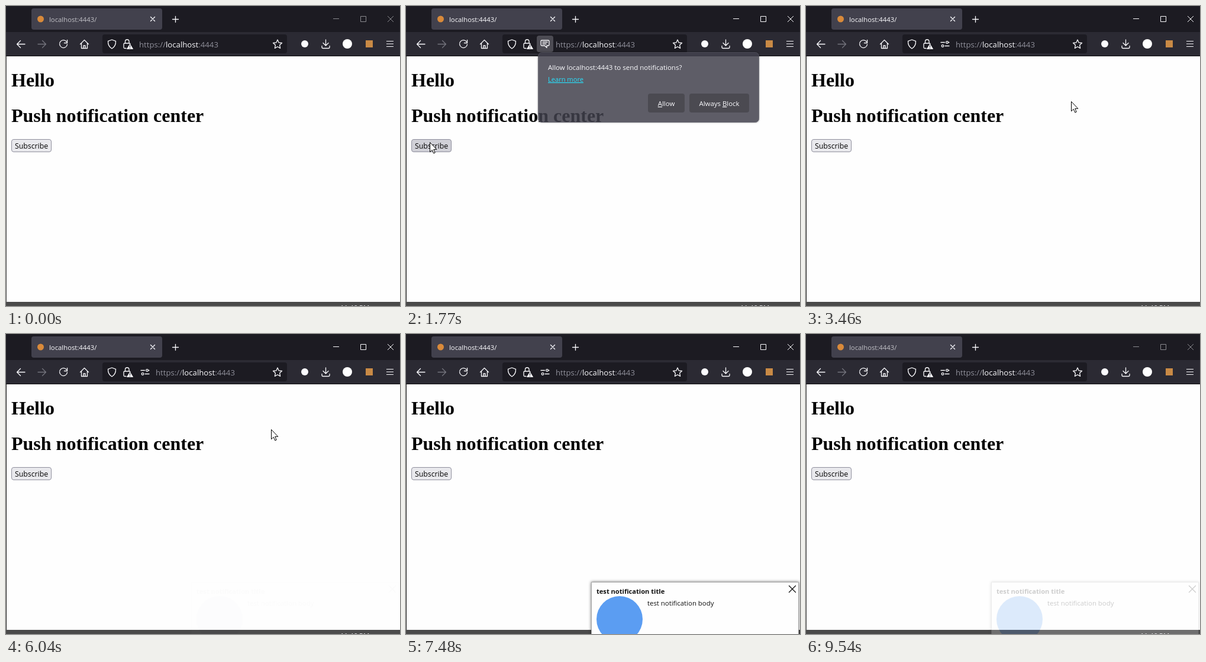
An HTML page for the animation above (9.61 s loop, 666x507 px).

```html
<!DOCTYPE html>
<html lang="en">
<head>
<meta charset="utf-8">
<title>Push notification demo</title>
<style>
html, body { margin: 0; width: 100%; height: 100%; overflow: hidden; background: #fff; }
svg { display: block; width: 666px; height: 507px; }
text { font: 11.4px "Open Sans", "Noto Sans", sans-serif; fill: #fbfbfe; white-space: pre; }
h1, .heading { font: bold 32px "Liberation Serif", "Times New Roman", serif; fill: #000; font-variant-ligatures: none; }
.url { font-size: 13.2px; }
.url .faint { fill: #8f8f9a; }
.line { fill: none; stroke: #fbfbfe; stroke-width: 1.3; stroke-linecap: round; stroke-linejoin: round; }
.thin { stroke-width: 1; stroke-linecap: butt; stroke-linejoin: miter; }
.off { stroke: #74747d; }
.strong { font-weight: 500; }
.dark { fill: #111; }
.access { text-decoration: underline; }

/* One loop; every change is a hard step. */
.title, .controls, .edge, .ask, .granted, .url, .button, .popup, .allow, .toast, .cursor {
  animation: 9610ms step-end infinite;
}
.title { animation-name: title; }
.controls { animation-name: controls; }
.edge { animation-name: edge; }
.ask { animation-name: ask; }
.granted { animation-name: granted; }
.url { animation-name: url; }
.button { animation-name: button; }
.popup { animation-name: popup; }
.allow { animation-name: allow; }
.toast { animation-name: toast; }
.cursor { animation-name: cursor; }

@keyframes title { 0%, 99.27%, 100% { opacity: .68; } 15.4% { opacity: 1; } }
@keyframes controls { 0%, 99.27%, 100% { opacity: .5; } 15.4% { opacity: 1; } }
@keyframes edge { 0%, 99.27%, 100% { fill: #4a4a4a; } 15.4% { fill: #222; } }
@keyframes ask { 0%, 34.65%, 100% { opacity: 0; } 16.12% { opacity: 1; } }
@keyframes granted { 0%, 100% { opacity: 0; } 34.65% { opacity: 1; } }
@keyframes url { 0%, 100% { transform: none; } 16.12% { transform: translateX(28px); } }
@keyframes button {
  0%, 21.85%, 100% { fill: #e9e9ed; }
  11.2%, 16.12% { fill: #d0d0d7; }
  15.4% { fill: #b1b1b9; }
}
@keyframes popup {
  0%, 36%, 100% { opacity: 0; transform: translateY(-10px); }
  16.85% { opacity: .04; transform: translateY(-10px); }
  17.58% { opacity: .45; transform: translateY(-2px); }
  18.31% { opacity: .85; transform: none; }
  19.14% { opacity: 1; transform: none; }
  34.65% { opacity: .4; transform: none; }
}
@keyframes allow { 0%, 100% { fill: #2b2a33; } 26.94% { fill: #52525e; } }
@keyframes toast {
  0%, 100% { opacity: 0; }
  62.85% { opacity: .01; }
  63.78% { opacity: .15; animation-timing-function: steps(5, end); }
  67.42% { opacity: 1; }
  97.18% { opacity: .8; }
  97.91% { opacity: .5; }
  99.27% { opacity: .2; }
}
@keyframes cursor {
  0%, 77.83%, 100% { transform: translate(700px, 520px); }
  4.16% { transform: translate(508px, 488px); animation-timing-function: steps(3, end); }
  6.34% { transform: translate(250px, 390px); animation-timing-function: steps(3, end); }
  8.53% { transform: translate(40px, 300px); }
  9.26% { transform: translate(1px, 262px); animation-timing-function: steps(3, end); }
  11.96% { transform: translate(40px, 230px); }
  21.85% { transform: translate(48px, 230px); }
  22.58% { transform: translate(85px, 229px); }
  23.31% { transform: translate(150px, 226px); }
  24.03% { transform: translate(225px, 221px); }
  24.76% { transform: translate(295px, 214px); }
  25.49% { transform: translate(352px, 206px); }
  26.22% { transform: translate(395px, 196px); }
  26.94% { transform: translate(424px, 183px); }
  27.67% { transform: translate(440px, 171px); }
  28.4% { transform: translate(446px, 164px); }
  29.13% { transform: translate(448px, 161px); }
  75.64% { transform: translate(462px, 180px); }
  76.37% { transform: translate(545px, 310px); }
  77.1% { transform: translate(650px, 468px); }
}
</style>
</head>
<body>
<svg viewBox="0 0 666 507">
  <!-- window -->
  <rect width="666" height="507" fill="#fefefe"/>
  <rect width="666" height="44" fill="#1c1b22"/>
  <rect y="44" width="666" height="40" fill="#2b2a33"/>
  <rect y="84" width="666" height="1" fill="#0c0c0d"/>
  <rect class="edge" y="85" width="1" height="415"/>
  <rect y="500" width="666" height="7" fill="#4a4a4a"/>
  <text x="565" y="514">11:46 PM</text>

  <!-- tab strip -->
  <rect x="43" y="4" width="221" height="36" rx="4" fill="#42414d"/>
  <circle cx="58.5" cy="22" r="5.5" fill="#d98a3a"/>
  <text class="title" x="73" y="26.5" style="font-size:11.3px">localhost:4443/</text>
  <path class="line" d="M244.5 18.5l7 7m0-7l-7 7M281.5 22.5h10m-5-5v10"/>
  <g class="controls line thin">
    <path d="M553 21.5h10M599.5 17.5h9v9h-9zM645 17l10 10m0-10l-10 10"/>
  </g>

  <!-- toolbar -->
  <g class="line">
    <path d="M32 64.5H18.5M24.5 58.5l-6 6 6 6"/>
    <path class="off" d="M54 64.5h13.5M61.5 58.5l6 6-6 6"/>
    <path d="M102.5 60.5A6.5 6.5 0 1 0 103.5 65M103.5 57.5v5h-5"/>
    <path d="M125.5 64.5l7-7 7 7M127.5 63v8.5h10V63M131 71.500v-4.500h3v4.500"/>
  </g>
  <rect x="163" y="48" width="312" height="32" rx="4" fill="#1c1b22"/>
  <g class="line">
    <path d="M179 57l6.500 2.300c.3 6-1.700 10-6.500 12.700-4.800-2.700-6.800-6.700-6.500-12.700z"/>
    <path d="M203 71.500h-2.500a1.500 1.500 0 0 1-1.500-1.500v-5.500a1.500 1.500 0 0 1 1.500-1.500h8a1.500 1.500 0 0 1 1.500 1M201.500 63v-3a3 3 0 0 1 6.500 0v3"/>
    <path d="M459 57l2.200 4.900 5.300.6-3.900 3.600 1 5.300-4.600-2.600-4.600 2.600 1-5.300-3.900-3.600 5.300-.6z"/>
    <path d="M540.500 57v9.500M536 62.500l4.500 4.500 4.500-4.500M534 67.500v2a2 2 0 0 0 2 2h9a2 2 0 0 0 2-2v-2"/>
    <path class="thin" d="M643 59.500h12m-12 4.500h12m-12 4.500h12"/>
  </g>
  <path d="M209.500 64.500l5 8h-10z" fill="#fbfbfe" stroke="#fbfbfe" stroke-linejoin="round"/>
  <path d="M209.500 66.500v3m0 1.200v1.200" stroke="#1c1b22" stroke-width="1.200"/>
  <circle cx="505" cy="64" r="6" fill="#fbfbfe"/>
  <circle cx="577" cy="64" r="8" fill="#fff"/>
  <rect x="608" y="58" width="12" height="12" fill="#c98a45"/>

  <g class="ask">
    <rect x="221" y="50" width="28" height="28" rx="4" fill="#4c4b53"/>
    <path class="line" d="M229.500 58h11a1.500 1.500 0 0 1 1.500 1.500v6a1.500 1.500 0 0 1-1.500 1.500h-2.500v3.500l-3.500-3.500h-5a1.500 1.500 0 0 1-1.500-1.500v-6a1.500 1.500 0 0 1 1.500-1.500zM231 61h8m-8 3h6"/>
  </g>
  <g class="granted line">
    <path d="M228 61.500h6.500M235 67.500h7"/>
    <circle cx="238.500" cy="61.500" r="1.800"/>
    <circle cx="231" cy="67.500" r="1.800"/>
    <path d="M240.500 61.500h1.500"/>
  </g>
  <text class="url" x="225" y="70"><tspan class="faint">https://</tspan>localhost<tspan class="faint">:4443</tspan></text>

  <!-- page -->
  <text class="heading" x="9" y="136">Hello</text>
  <text class="heading" x="9" y="196">Push notification center</text>
  <rect class="button" x="9.500" y="225.500" width="67" height="21" rx="3.500" stroke="#8f8f9d"/>
  <text x="15" y="241" style="font-size:12.3px;fill:#000">Subscribe</text>

  <!-- permission prompt -->
  <g class="popup">
    <rect x="223.500" y="78.500" width="373" height="118" rx="6" fill="#42414d" stroke="#52525e" style="filter:drop-shadow(0 0 1.500px #0006)"/>
    <text class="strong" x="240" y="108" style="font-size:11.500px">Allow localhost:4443 to send notifications?</text>
    <text x="240" y="128" style="font-size:11.100px;fill:#00ddff;text-decoration:underline">Learn more</text>
    <rect class="allow" x="409" y="148" width="62" height="32" rx="4"/>
    <rect x="479" y="148" width="101" height="32" rx="4" fill="#2b2a33"/>
    <g text-anchor="middle">
      <text class="strong" x="440" y="169"><tspan class="access">A</tspan>llow</text>
      <text class="strong" x="529.500" y="169">Always <tspan class="access">B</tspan>lock</text>
    </g>
  </g>

  <!-- notification -->
  <g class="toast">
    <rect x="313.500" y="419.500" width="350" height="110" fill="#fefefe" stroke="#aaa" style="filter:drop-shadow(0 0 2.500px #0009)"/>
    <text class="dark" x="322" y="439" style="font-size:11.100px;font-weight:bold">test notification title</text>
    <text class="dark" x="408" y="459">test notification body</text>
    <circle cx="361" cy="482" r="39" fill="#5b9df2"/>
    <path class="line" d="M647.500 425.500l11 11m0-11l-11 11" style="stroke:#111"/>
  </g>

  <path class="cursor" d="M.5.500v16.300l3.700-3.500 2.600 5.700 2.400-1-2.500-5.600h5.100z" fill="#fff" stroke="#000"/>
</svg>
</body>
</html>
```
